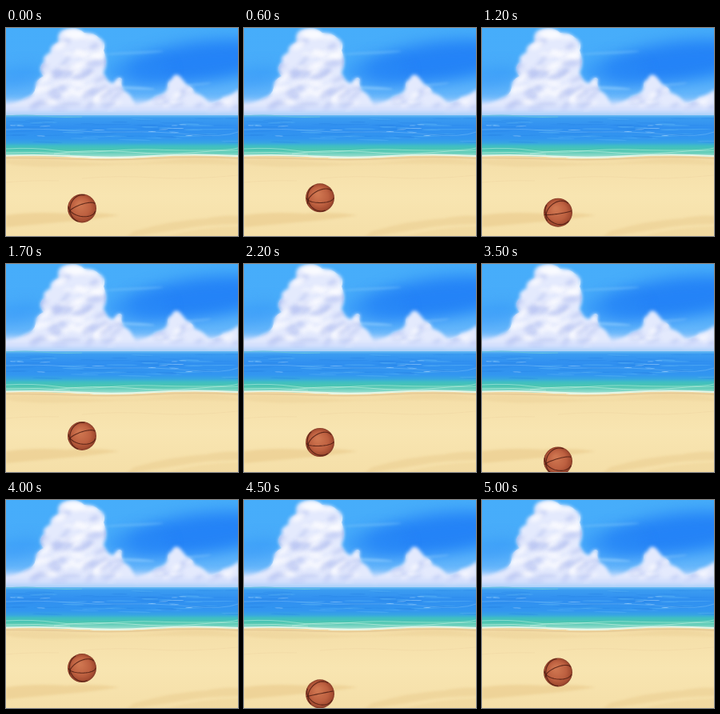
An HTML page with a canvas for the animation above (5.1 s loop, 290x260 px).

```html
<!DOCTYPE html>
<html lang="en">
<head>
<meta charset="utf-8">
<title>Beach ball bounce</title>
<style>
html, body { margin: 0; width: 290px; height: 260px; overflow: hidden; }
canvas { display: block; }
</style>
</head>
<body>
<canvas id="stage" width="290" height="260"></canvas>
<script>
const W = 290, H = 260, STEP = 100, COUNT = 51;
const ctx = document.getElementById('stage').getContext('2d');
const back = document.createElement('canvas');
back.width = W;
back.height = H;
const b = back.getContext('2d');

let seed = 11;
const rnd = (lo = 0, hi = 1) => {
  seed = (seed * 16807) % 2147483647;
  return lo + (hi - lo) * seed / 2147483647;
};

function gradient(y0, y1, stops) {
  const g = b.createLinearGradient(0, y0, 0, y1);
  stops.forEach(([at, color]) => g.addColorStop(at, color));
  return g;
}

function oval(x, y, rx, ry, color, turn = 0) {
  b.fillStyle = color;
  b.beginPath();
  b.ellipse(x, y, rx, ry, turn, 0, 7);
  b.fill();
}

function shape(d, color, blur = 0) {
  b.filter = blur ? `blur(${blur}px)` : 'none';
  b.fillStyle = color;
  b.fill(new Path2D(d));
  b.filter = 'none';
}

function stroke(d, color, width) {
  b.strokeStyle = color;
  b.lineWidth = width;
  b.stroke(new Path2D(d));
}

function drawSky() {
  b.fillStyle = gradient(0, 110, [[0, '#46adfa'], [.5, '#49acfa'], [.8, '#6bb9fb'], [1, '#b0d4fa']]);
  b.fillRect(0, 0, W, 112);
  b.filter = 'blur(9px)';
  oval(245, 42, 95, 25, 'rgba(30,124,246,.85)', -.12);
  oval(165, 55, 38, 18, 'rgba(42,138,247,.6)');
  oval(15, 62, 32, 12, 'rgba(48,146,248,.5)', -.2);
  b.filter = 'blur(1.5px)';
  oval(160, 31, 38, 1.5, 'rgba(120,196,252,.5)', -.05);
  oval(158, 75, 28, 1.8, 'rgba(150,208,253,.6)', .05);
  oval(235, 71, 22, 1.5, 'rgba(130,196,252,.5)', -.1);
  b.filter = 'none';
}

function drawClouds() {
  const big = 'M70 3Q86-4 98 6Q110 5 116 12Q126 17 122 28Q128 42 122 56Q126 68 134 69Q141 58 145 64Q143 73 147 78Q157 83 159 92L168 105H-4V97Q14 95 24 88Q36 84 37 74Q36 66 47 60Q39 50 48 42Q44 36 56 30Q53 23 66 17Q63 8 70 3Z';
  const small = 'M164 97Q180 92 188 85Q202 82 202 72Q202 66 207 64Q211 55 218 61Q222 66 226 71Q233 73 236 81Q247 84 252 92L268 105H160Z';
  const edge = 'M252 96Q266 93 272 86Q282 84 292 76V106H250Z';
  b.filter = 'blur(4px)';
  b.fillStyle = gradient(88, 112, [[0, 'rgba(222,231,255,0)'], [.35, '#dce5fe'], [.7, '#c6d7fb'], [1, '#a3cdf8']]);
  b.fillRect(-10, 90, 310, 22);
  b.filter = 'none';
  [big, small, edge].forEach(d => shape(d, '#e4eafd', 2.2));

  b.save();
  const mask = new Path2D(big);
  mask.addPath(new Path2D(small));
  mask.addPath(new Path2D(edge));
  b.clip(mask);
  b.filter = 'blur(2.5px)';
  for (let i = 0; i < 90; i++) {
    oval(rnd(25, 155), rnd(10, 102), rnd(5, 13), rnd(1.8, 4.5), i % 2 ? 'rgba(172,186,240,.5)' : 'rgba(252,252,255,.75)', rnd(-.9, .2));
  }
  for (let i = 0; i < 24; i++) {
    oval(rnd(168, 290), rnd(70, 102), rnd(4, 10), rnd(1.5, 3.5), i % 2 ? 'rgba(165,184,242,.5)' : 'rgba(252,252,255,.75)', rnd(-.7, .2));
  }
  oval(86, 8, 14, 6, 'rgba(255,255,255,.8)');
  b.restore();

  b.filter = 'blur(2.5px)';
  b.fillStyle = 'rgba(205,218,252,.65)';
  b.fillRect(-5, 98, 300, 7);
  b.fillStyle = 'rgba(168,207,250,.75)';
  b.fillRect(-5, 105, 300, 6);
  b.filter = 'none';
}

function drawSea() {
  b.fillStyle = gradient(109, 160, [[0, '#6bbcf2'], [.07, '#3b9cf1'], [.3, '#308ff0'], [.58, '#3296f0'], [.68, '#37a5e2'], [.75, '#3fbdc4'], [.86, '#4cc6b0'], [1, '#93dccc']]);
  b.fillRect(0, 109, W, 52);
  for (let i = 0; i < 60; i++) {
    oval(rnd(0, W), rnd(112, 143), rnd(6, 26), rnd(.4, .9), i % 3 ? 'rgba(36,126,226,.3)' : 'rgba(92,182,246,.5)', rnd(-.03, .03));
  }
  for (let i = 0; i < 12; i++) {
    oval(rnd(0, W), rnd(120, 136), rnd(3, 12), .4, 'rgba(200,232,255,.55)', rnd(-.03, .06));
  }
  stroke('M0 110Q25 108 45 110T95 111', '#62bfe0', 1.2);
  stroke('M0 127Q40 125 76 128T150 130T230 133T290 130', 'rgba(160,214,252,.45)', .7);
  stroke('M0 151Q35 149 62 153T125 154T185 152T245 153T290 150', 'rgba(205,244,228,.55)', .9);
  stroke('M60 157Q110 151 155 155T230 156T290 153', 'rgba(215,246,232,.6)', .9);
  stroke('M0 156Q40 154 80 158', 'rgba(205,244,226,.55)', .9);
}

function drawSand() {
  shape('M0 160Q45 159 90 162T185 161T290 161V260H0Z', gradient(160, 260, [[0, '#f0d6a0'], [.08, '#f5dfa9'], [.5, '#f8e5b1'], [1, '#f5dfa8']]));
  stroke('M0 159.5Q45 158 90 160.5T185 160T290 160', '#e6f5e6', 1.8);
  stroke('M0 162.5Q45 162 90 164T185 163T290 163', '#e6ca96', 1.5);
  shape('M0 166Q50 164 100 168T200 166T290 168V171Q190 168 110 172T0 169Z', 'rgba(236,208,152,.45)', 1);
  shape('M0 234Q35 229 75 232Q110 229 142 234Q112 239 88 241Q42 245 0 249Z', 'rgba(235,205,144,.7)', 1.5);
  shape('M160 254Q205 241 250 238Q275 233 292 235V245Q250 245 220 251Q190 256 150 262Z', 'rgba(236,207,147,.6)', 1.5);
  shape('M195 262Q240 249 292 248V262Z', 'rgba(238,210,152,.45)', 1.2);
  stroke('M95 188Q140 184 185 187T290 184', 'rgba(240,216,163,.6)', 1);
  stroke('M0 193Q30 190 66 191', 'rgba(240,216,163,.6)', 1);
}

// Landing moments, counted in steps; each hop between them is a parabola.
const lands = [-6.3, 1.4, 13.6, 24.2, 34.9, 44.7, 52.4];
function ballY(n) {
  const i = lands.findIndex(t => t > n);
  const mid = (lands[i] + lands[i - 1]) / 2;
  const half = (lands[i] - lands[i - 1]) / 2;
  return 210 + 38 * ((n - mid) / half) ** 2;
}

const R = 18, CX = 95;
const axis = [-.88, .17, .44], u = [.19, .98, 0], v = [-.431, .084, -.895];
const mix = (p, q, r) => axis.map((a, k) => a * p + u[k] * q + v[k] * r);

function seam(cy, point) {
  ctx.beginPath();
  let pen = false;
  for (let i = 0; i <= 72; i++) {
    const [x, y, z] = point(i * Math.PI / 36);
    if (z > 0) ctx[pen ? 'lineTo' : 'moveTo'](CX + x * (R - 1), cy + y * (R - 1));
    pen = z > 0;
  }
  ctx.stroke();
}

function drawBall(n) {
  const cy = ballY(n), spin = n / COUNT * Math.PI * 2;
  const g = ctx.createRadialGradient(CX - 3, cy - 5, 2, CX, cy, R);
  g.addColorStop(0, '#cf7650');
  g.addColorStop(.6, '#bd6040');
  g.addColorStop(.88, '#a44c31');
  g.addColorStop(1, '#823a27');
  ctx.fillStyle = g;
  ctx.beginPath();
  ctx.arc(CX, cy, R, 0, 7);
  ctx.fill();
  ctx.strokeStyle = 'rgba(72,26,16,.8)';
  ctx.lineWidth = 1.1;
  for (let k = 0; k < 3; k++) {
    const f = spin + .2 + k * Math.PI / 3;
    seam(cy, a => mix(Math.cos(a), Math.sin(a) * Math.cos(f), Math.sin(a) * Math.sin(f)));
  }
}

function render(ms) {
  const n = Math.floor(ms / STEP) % COUNT;
  ctx.drawImage(back, 0, 0);
  drawBall(n);
}

drawSky();
drawClouds();
drawSea();
drawSand();

const start = performance.now();
function tick() {
  render(performance.now() - start);
  requestAnimationFrame(tick);
}
tick();
</script>
</body>
</html>
```
